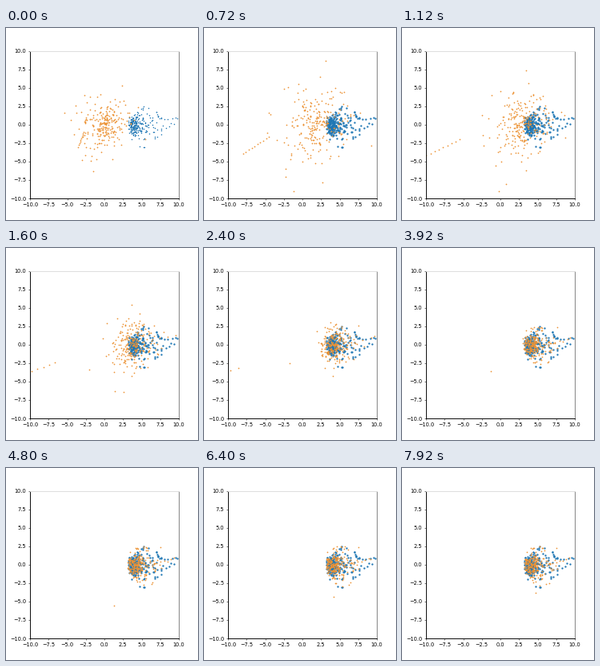
A matplotlib script that plays this animation: 240x240 px, repeating every 8000 ms.

```python
import numpy as np
import matplotlib.pyplot as plt
from matplotlib.animation import FuncAnimation

FRAMES, INTERVAL = 100, 80
N = 250
rng = np.random.default_rng(5)


def wedge(n, n_tail):
    """Skewed cloud: sharp left edge, wider and sparser to the right."""
    x = np.minimum(2.8 + np.exp(0.4 + 0.56 * rng.normal(size=n)), 7.6)
    sd = np.clip(0.5 + 0.32 * (x - 3), 0.4, 1.3)
    y = np.clip(sd * rng.normal(size=n) - 0.1, -3.0, 2.8)
    tail_x = np.linspace(6.4, 9.8, n_tail)
    tail_y = 0.4 + 0.9 * rng.normal(size=n_tail)
    return np.column_stack([np.append(x, tail_x), np.append(y, tail_y)])


target = wedge(235, 17)

# Start: heavy-tailed round cloud; home: the resting place of each point
start = rng.normal(size=(N, 2)) * (1.35, 1.45)
start *= np.exp(0.38 * rng.normal(size=(N, 1)))
radius = np.hypot(*start.T)[:, None]
start *= np.minimum(1, 6.5 / radius)
radius = np.minimum(radius, 6.5)
home = wedge(N, 0)
x = np.linspace(6.6, 9.2, 7)  # sparse rising streak on the right
home[-7:] = np.column_stack([x, 0.1 + 0.31 * (x - 6.7)])
burst = start * (0.25 + 0.09 * radius) + 1.1 * rng.normal(size=(N, 2))
phase = rng.uniform(0, 2 * np.pi, size=(N, 2))

# Points that run off to the lower left in a line
u = np.linspace(0, 1, 10)
run_from = np.column_stack([-2.8 - 0.7 * u, -1 - 2 * u])
run_speed = -np.column_stack([0.24 + 0.4 * u, 0.09 + 0.04 * u])

# The last straggler: step, x, y
drift = np.array([
    (0, -2.9, -1.6), (16, -2.0, -3.4), (32, -1.5, -1.6), (40, -1.3, -3.9),
    (48, 1.3, -5.5), (64, 4.2, -4.4), (79, 4.7, -3.8)])


def cloud(k):
    pull = np.exp(-(k / 11) ** 1.5)
    kick = k / 8 * np.exp(1 - k / 8)
    wobble = 0.08 * (np.sin(k / 6 + phase) - np.sin(phase))
    p = home + (start - home) * pull + burst * kick + wobble
    p[:len(u)] = run_from + run_speed * k
    p[len(u)] = [np.interp(k, drift[:, 0], drift[:, c]) for c in (1, 2)]
    return p


fig, ax = plt.subplots(figsize=(5, 5), dpi=48)
fig.subplots_adjust(bottom=0.1125)
ax.set(xlim=(-10, 10), ylim=(-10, 10))
ticks = np.arange(-10, 10.1, 2.5)
ax.set_xticks(ticks)
ax.set_yticks(ticks)
for side, color in dict(left="black", bottom="black",
                        right="#808080", top="#dcdcdc").items():
    ax.spines[side].set(color=color, linewidth=1.4)
blue = ax.scatter(*target.T, s=5, c="tab:blue", linewidths=0)
orange = ax.scatter(*cloud(0).T, s=6.5, c="#ec9234", linewidths=0)


def update(frame):
    k = frame - (frame + 2) // 5  # one held frame in every five
    orange.set_offsets(cloud(k))
    blue.set_sizes([5 if k == 0 else 12])
    return blue, orange


anim = FuncAnimation(fig, update, frames=FRAMES, interval=INTERVAL,
                     repeat=True, repeat_delay=0, blit=False)
plt.show()
```
